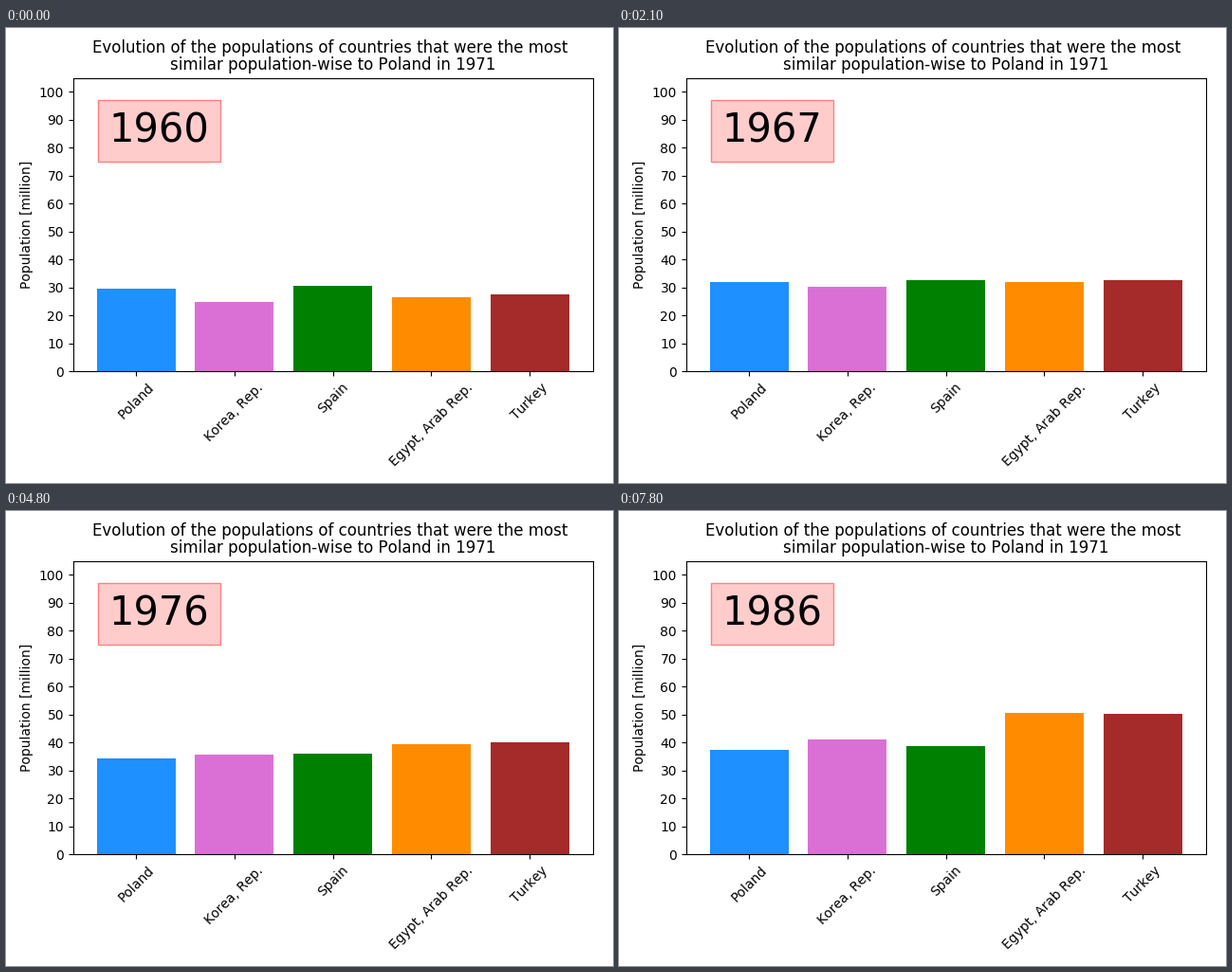
Write a matplotlib script that moves like this. It is 640x480 px and loops after 8000 ms.

```python
import numpy as np
import matplotlib.pyplot as plt
from matplotlib.animation import FuncAnimation

WIDTH, HEIGHT, DPI = 640, 480, 100
INTERVAL, FRAMES, FRAMES_PER_YEAR = 100, 80, 3
START, END = 1960, 1986

# Bar colour and millions of people at five evenly spaced moments
COUNTRIES = {
    "Poland": ("dodgerblue", [29.64, 31.83, 33.36, 35.41, 37.46]),
    "Korea, Rep.": ("orchid", [25.01, 29.78, 34.05, 37.80, 41.21]),
    "Spain": ("green", [30.46, 32.48, 34.99, 37.34, 38.58]),
    "Egypt, Arab Rep.": ("darkorange", [26.63, 31.54, 36.85, 42.78, 50.66]),
    "Turkey": ("brown", [27.47, 32.10, 37.47, 43.48, 50.13]),
}


def growth_curve(values):
    """Smooth curve through the key values, over time running from 0 to 1."""
    times = np.linspace(0, 1, len(values))
    return np.poly1d(np.polyfit(times, values, len(values) - 1))


plt.rcParams.update({"font.family": "DejaVu Sans", "text.kerning_factor": 6})
colors, key_values = zip(*COUNTRIES.values())
curves = [growth_curve(values) for values in key_values]

fig = plt.figure(figsize=(WIDTH / DPI, HEIGHT / DPI), dpi=DPI)
left, right, bottom, top = 70.7, 618.6, 117.75, 427.35
ax = fig.add_axes([left / WIDTH, bottom / HEIGHT,
                   (right - left) / WIDTH, (top - bottom) / HEIGHT])
bars = ax.bar(list(COUNTRIES), [curve(0) for curve in curves], color=colors)
ax.set_xlim(-0.64, 4.64)
ax.set_ylim(0, 105)
ax.set_yticks(range(0, 101, 10))
ax.tick_params(axis="x", rotation=45)
ax.set_ylabel("Population [million]")
ax.set_title("Evolution of the populations of countries that were the most \n"
             "similar population-wise to Poland in 1971", linespacing=1.0)
year_label = ax.text(0.166, 0.82, str(START), size=30, ha="center", va="center",
                     transform=ax.transAxes,
                     bbox=dict(boxstyle="square,pad=0.28",
                               ec=(1, 0.5, 0.5), fc=(1, 0.8, 0.8)))


def update(frame):
    year = START + frame // FRAMES_PER_YEAR
    progress = (year - START) / (END - START)
    for bar, curve in zip(bars, curves):
        bar.set_height(curve(progress))
    year_label.set_text(str(year))
    return [*bars, year_label]


anim = FuncAnimation(fig, update, frames=FRAMES, interval=INTERVAL,
                     repeat=True, repeat_delay=0)
plt.show()
```
